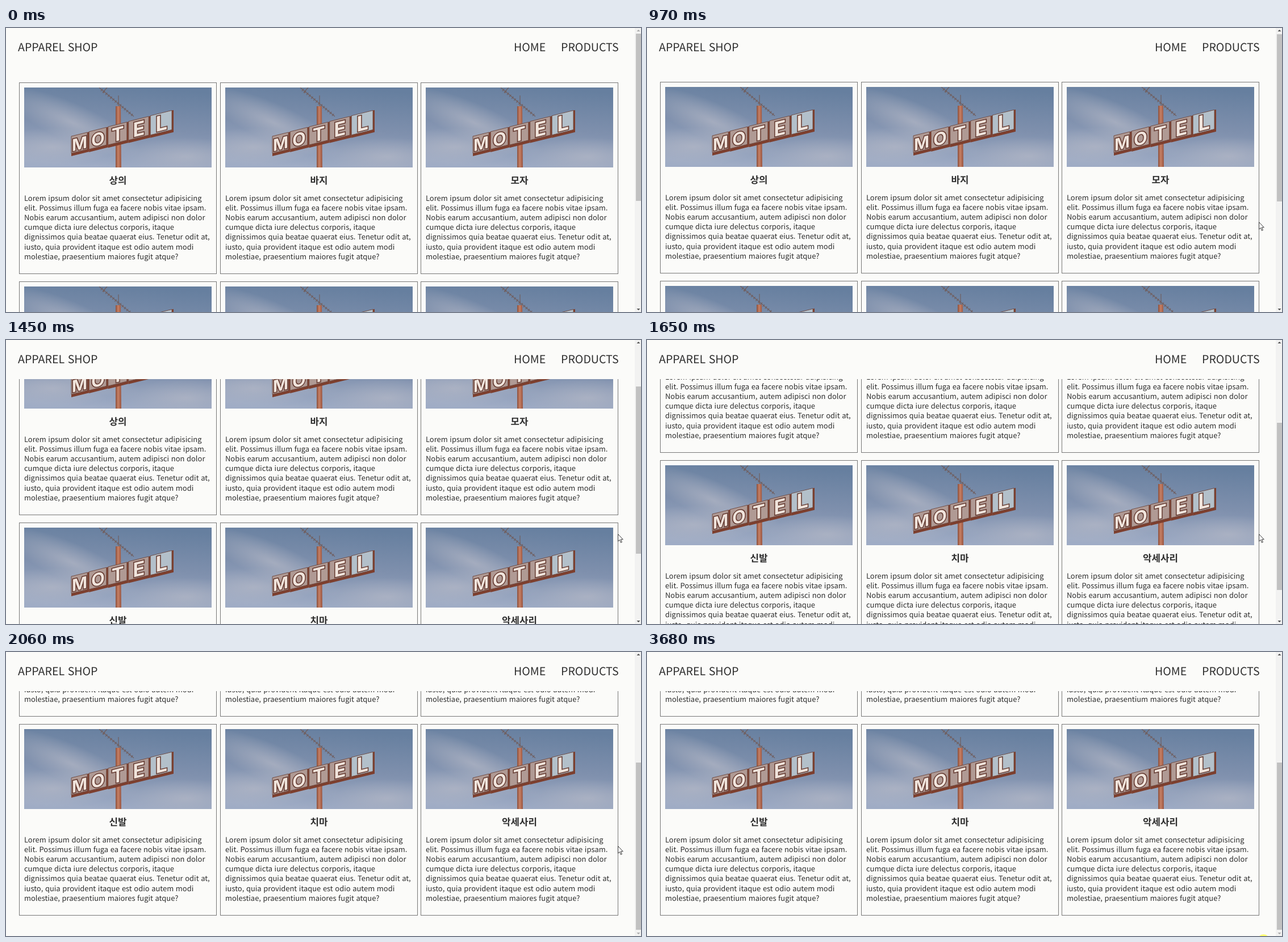
Recreate the animation shown at these times as an HTML page. Size 1118x501 px, loop 3750 ms.

```html
<!DOCTYPE html>
<html lang="ko">
<head>
<meta charset="utf-8">
<title>Apparel shop</title>
<style>
html, body { margin: 0; width: 100%; height: 100%; overflow: hidden; background: #fbfbf9; }
svg { display: block; }
text { font: 12.94px "Noto Sans CJK KR", "Noto Sans CJK", sans-serif; fill: #2e2e2e; text-rendering: geometricPrecision; }
.nav { font-size: 19.6px; }
.title { font-size: 16.85px; font-weight: 700; text-anchor: middle; }
.sign { font-family: Inter, sans-serif; font-weight: 700; text-anchor: middle; fill: #f0e4dc; stroke: #63382e; stroke-width: 3; paint-order: stroke; }
</style>
</head>
<body>
<svg width="1118" height="501" viewBox="0 0 1118 501">
  <defs>
    <linearGradient id="sky" x1=".65" y1="0" x2=".45" y2="1">
      <stop stop-color="#667f9f"/>
      <stop offset=".5" stop-color="#7f90ad"/>
      <stop offset="1" stop-color="#9facc5"/>
    </linearGradient>
    <radialGradient id="cloud">
      <stop stop-color="#b4b8c6" stop-opacity=".7"/>
      <stop offset="1" stop-color="#b4b8c6" stop-opacity="0"/>
    </radialGradient>
    <linearGradient id="rust">
      <stop stop-color="#8c503d"/>
      <stop offset=".45" stop-color="#c67f63"/>
      <stop offset="1" stop-color="#985440"/>
    </linearGradient>
    <clipPath id="crop"><path d="M0 0H330V141H0Z"/></clipPath>
    <g id="photo" clip-path="url(#crop)">
      <path fill="url(#sky)" d="M0 0H330V141H0Z"/>
      <g fill="url(#cloud)">
        <ellipse cx="85" cy="62" rx="130" ry="34" transform="rotate(24 85 62)"/>
        <ellipse cx="50" cy="105" rx="110" ry="34"/>
        <ellipse cx="285" cy="122" rx="110" ry="34"/>
      </g>
      <g fill="none" stroke="#705f60">
        <path d="M132 0L193 51M146 0l-8 9M166 14V33" stroke-width="1.2"/>
        <path d="M136 4L193 51" stroke-width="5" stroke-dasharray="1.3 4"/>
      </g>
      <path fill="url(#rust)" d="M161 33h9l1 108h-10z"/>
      <g id="sign"></g>
    </g>
  </defs>
  <g id="page"></g>
  <path fill="#fbfbf9" d="M0 0H1107V69H0Z"/>
  <text class="nav" x="21" y="41">APPAREL SHOP</text>
  <text class="nav" x="894" y="41">HOME</text>
  <text class="nav" x="977" y="41">PRODUCTS</text>
  <path fill="#f2f2f1" d="M1107 0H1118V501H1107Z"/>
  <rect id="thumb" x="1109" width="9" height="295" fill="#c1c1c1"/>
  <path id="up" d="M1110.5 6l3-3 3 3z"/>
  <path id="down" d="M1110.5 495l3 3 3-3z"/>
  <path id="cursor" d="M.5.5V13.2L3.4 10.5L5.4 15.4L7.4 14.6L5.4 9.8H9.3Z" fill="#fff" stroke="#222" stroke-width=".9"/>
  <circle id="glow" cx="1085.5" cy="509" r="11" fill="#ffff70"/>
</svg>
<script>
const $ = id => document.getElementById(id);
const set = (id, name, value) => $(id).setAttribute(name, value);
const LOOP = 3750, STEP = 67.9, PITCH = 351, NOTCH = 83, MAX = 320;
const titles = ["상의", "바지", "모자", "신발", "치마", "악세사리"];
const lines = [
  "Lorem ipsum dolor sit amet consectetur adipisicing",
  "elit. Possimus illum fuga ea facere nobis vitae ipsam.",
  "Nobis earum accusantium, autem adipisci non dolor",
  "cumque dicta iure delectus corporis, itaque",
  "dignissimos quia beatae quaerat eius. Tenetur odit at,",
  "iusto, quia provident itaque est odio autem modi",
  "molestiae, praesentium maiores fugit atque?"
];

// Sign boxes grow to the right along a rising line
const left = i => 83 + 30 * i + 1.2 * i * i;
const box = (letter, i) => {
  const x = left(i), w = left(i + 1) - x, h = 30 + i;
  return `<g transform="translate(${x} ${86 - .26 * (x - 83)}) skewY(-14)">
    <rect width="${w}" height="${h + 5}" fill="#7d3f2e"/>
    <rect width="${w - 3}" height="${h}" fill="${i < 4 ? "#b09a94" : "#b3c0ca"}" stroke="#6b473f" stroke-width=".8"/>
    <text class="sign" x="${w / 2 - 1}" y="${h - 3}" style="font-size:${29 + 2 * i}px">${letter}</text>
  </g>`;
};
$("sign").innerHTML = [..."MOTEL"].map(box).join("");

const card = (title, i) => `
  <g transform="translate(${Math.round(353.5 * (i % 3))} ${Math.floor(i / 3) * PITCH})">
    <rect x="23.5" y="96.5" width="347" height="337" fill="none" stroke="#777"/>
    <use href="#photo" x="32" y="105"/>
    <text class="title" x="197" y="275">${title}</text>
    ${lines.map((s, n) => `<text x="32" y="${Math.round(304.5 + 17.2 * n)}">${s}</text>`).join("")}
  </g>`;
$("page").innerHTML = titles.map(card).join("");

const part = (t, from, to) => Math.min(1, Math.max(0, (t - from) / (to - from)));
const smooth = p => p * p * (3 - 2 * p);

// Four wheel notches, stopped by the end of the page
function scrollAt(t) {
  const notches = [952, 1340, 1495, 1844].reduce((sum, s) => sum + smooth(part(t, s, s + 200)), 0);
  return Math.min(MAX, Math.round(NOTCH * notches));
}

// The pointer glides in from below, rests, then leaves in a shallow bend
function pointerAt(t) {
  const enter = (1 - part(t, 150, 710)) ** 2, leave = part(t, 2725, 3415);
  return [
    Math.round(1077 + 5 * enter + 30 * leave * leave - 22 * leave),
    Math.round(342 + 135 * enter + 159 * smooth(leave))
  ];
}

function draw(now) {
  const t = 150 + Math.floor((now % LOOP - 147) / STEP) * STEP;
  const y = scrollAt(t);
  set("page", "transform", `translate(0 ${-y})`);
  set("thumb", "y", Math.round(10 + y * .578));
  set("up", "fill", y > 0 ? "#505050" : "#a8a8a8");
  set("down", "fill", y < MAX ? "#505050" : "#a8a8a8");
  set("cursor", "transform", `translate(${pointerAt(t)})`);
  set("cursor", "visibility", t < 150 ? "hidden" : "visible");
  set("glow", "visibility", t > 3660 ? "visible" : "hidden");
}
let start;
function tick(now) {
  start ??= now;
  draw(now - start);
  requestAnimationFrame(tick);
}
draw(0);
requestAnimationFrame(tick);
</script>
</body>
</html>
```
